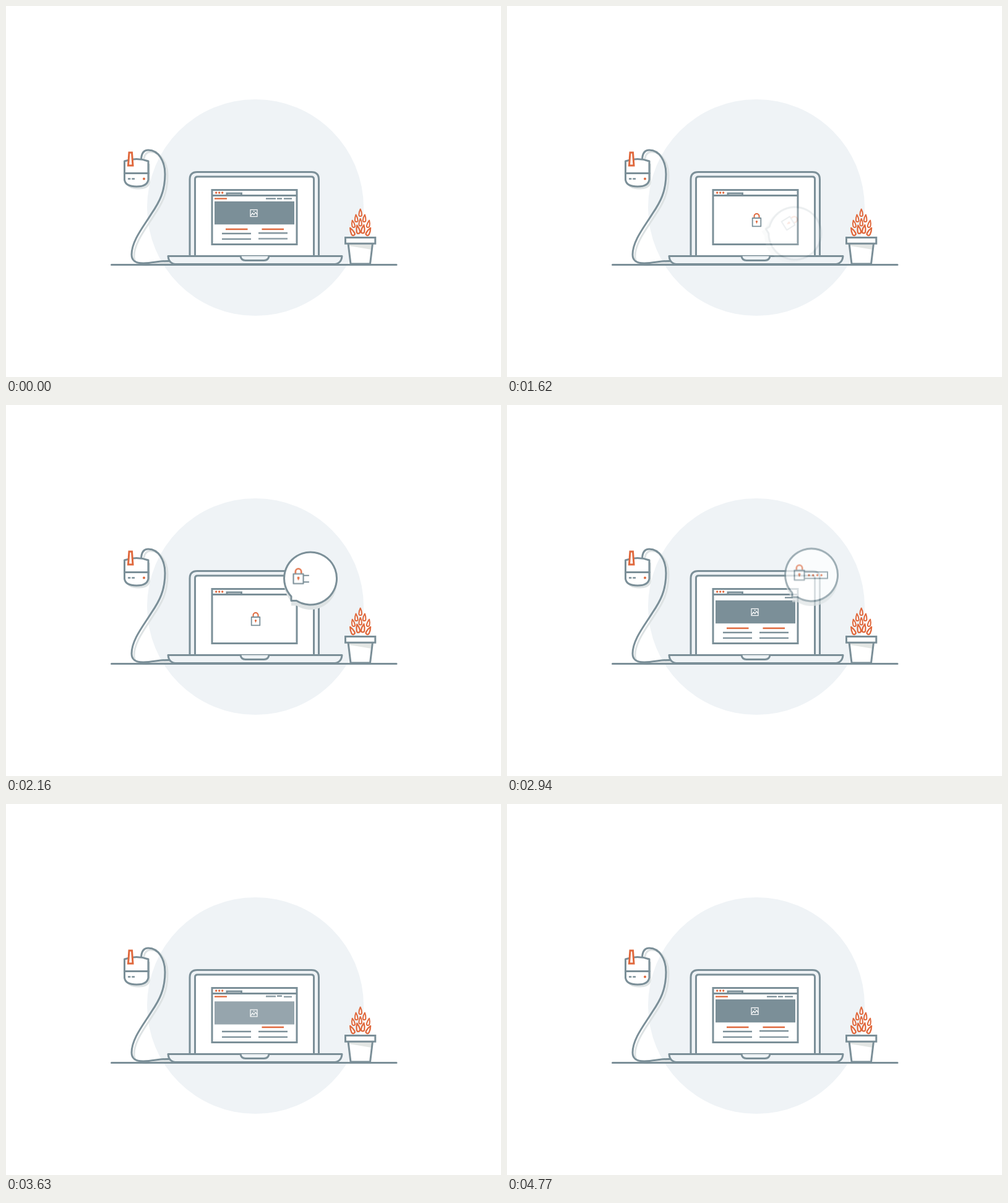
An HTML page without scripts for the animation above (4.8 s loop, 800x600 px).

```html
<!DOCTYPE html>
<html lang="en">
<head>
<meta charset="utf-8">
<title>Locked page</title>
<style>
  html, body { margin: 0; width: 100%; height: 100%; overflow: hidden; background: #fff; }
  svg { display: block; width: 800px; height: 600px; }

  .line { fill: none; stroke: #7b8f98; stroke-width: 3; stroke-linecap: round; stroke-linejoin: round; }
  .white { fill: #fff; }
  .pale { fill: #eff3f6; }
  .hot { stroke: #e0683c; }
  .dot { fill: #e0683c; }
  .shade { fill: #dee3e4; }
  .thin { stroke-width: 2.3; stroke-linecap: butt; }
  .fine { stroke-width: 1.8; }

  .led, .window, .page, .lock, .lift, .spin, .field path, .pin circle, .rise {
    animation: 4.8s linear infinite;
  }

  .led { animation-name: blink; animation-duration: .8s; }
  @keyframes blink {
    0%, 3.1% { opacity: 1; }
    3.11%, 54.4% { opacity: 0; }
    54.41%, 100% { opacity: 1; }
  }

  .window { animation-name: swap; }
  @keyframes swap {
    0%, 8.54% { transform: none; opacity: 1; animation-timing-function: ease-in; }
    11.25% { transform: translateX(-24px); opacity: 0; }
    11.26% { transform: translateX(30px); opacity: 0; }
    13.7% { transform: translateX(19px); opacity: 1; animation-timing-function: cubic-bezier(.2, .4, .6, 1); }
    19.38%, 100% { transform: none; opacity: 1; }
  }

  .page { animation-name: page; }
  @keyframes page {
    0%, 11.25% { opacity: 1; }
    11.26%, 56% { opacity: 0; }
    56.01%, 100% { opacity: 1; }
  }

  .rise { animation-name: rise; animation-delay: calc(var(--at) * 1ms - 4800ms); }
  @keyframes rise {
    0% { transform: translateY(20px); opacity: 0; animation-timing-function: cubic-bezier(.37, 0, .63, 1); }
    14.58% { transform: translateY(-1px); opacity: 1; animation-timing-function: ease-in-out; }
    18.1%, 100% { transform: none; opacity: 1; }
  }

  .lock { animation-name: lock; }
  @keyframes lock {
    0%, 19.7% { opacity: 0; animation-timing-function: ease-in-out; }
    30%, 57.2% { opacity: 1; }
    60.6%, 100% { opacity: 0; }
  }

  .lift { animation-name: lift; }
  @keyframes lift {
    0%, 33.12% { opacity: 0; transform: none; }
    33.75% { opacity: .15; }
    37% { opacity: 1; }
    57.2% { opacity: 1; transform: none; animation-timing-function: cubic-bezier(.37, 0, .63, 1); }
    68.4%, 100% { opacity: 0; transform: translateY(-20px); }
  }

  .spin { animation-name: spin; transform-origin: 400px 300px; }
  @keyframes spin {
    0%, 33.12% { transform: rotate(60deg); }
    33.75% { transform: rotate(58deg); animation-timing-function: ease-in-out; }
    39.6% { transform: rotate(-13.6deg); animation-timing-function: ease-in-out; }
    44.8%, 100% { transform: none; }
  }

  .field path { stroke-width: 2; stroke-linecap: butt; stroke-dasharray: 43 60; animation-name: draw; }
  @keyframes draw {
    0%, 42.8% { stroke-dashoffset: 43.5; animation-timing-function: cubic-bezier(.37, 0, .63, 1); }
    50%, 100% { stroke-dashoffset: 0; }
  }

  .pin circle { animation-name: pin; animation-delay: calc(var(--i) * 80ms); animation-fill-mode: backwards; }
  @keyframes pin {
    0%, 47.5% { opacity: 0; }
    49%, 90% { opacity: 1; }
    90.01%, 100% { opacity: 0; }
  }
</style>
</head>
<body>
<svg viewBox="0 0 800 600">
  <defs>
    <path id="cable" d="M218.5 248C219 236 224 233 230 233C247 233 257 252 257 272C257 300 248 317 235 336C222 357 203 380 203 402C203 411 208 416 222 416C238 416 250 411.5 265 412.5"/>
    <path id="router" d="M191.5 251Q211 244 230 251V281Q228 292 211 292Q193 292 191.5 281Z"/>
    <path id="bubble" d="M461 309.5V316.5H469.5A42.5 42.5 0 1 0 461 309.5Z"/>
    <path id="leaf" d="M0-6C2-2 2.3 1 2.3 3A2.3 2.6 0 0 1-2.3 3C-2.3 1-2-2 0-6Z"/>
    <g id="padlock">
      <path class="line fine hot" style="stroke-width:2" d="M399.5 343V340A4 4 0 0 1 407.5 340V343"/>
      <rect class="line fine white" x="396.7" y="343" width="13.6" height="13.4"/>
      <circle class="dot" cx="403.5" cy="348.5" r="1.6"/>
      <path class="line fine hot" style="stroke-width:1.4" d="M403.5 349V351"/>
    </g>
  </defs>

  <circle class="pale" cx="403" cy="326" r="175"/>

  <!-- router and cable -->
  <use href="#cable" class="line" style="stroke:#dee3e4" x="4" y="3"/>
  <use href="#router" class="shade" x="3" y="4.5"/>
  <use href="#cable" class="line"/>
  <use href="#router" class="line white"/>
  <path class="line" d="M191.5 270.5H230"/>
  <path class="line thin" d="M197 279.5H201.3M203.3 279.5H208"/>
  <circle class="dot led" cx="223" cy="279.5" r="2"/>
  <path class="line hot white" d="M199 237H203.5L205 258H197.5Z" style="stroke-linejoin:miter"/>

  <!-- plant -->
  <path class="white" d="M553 384L557 417H588.5L592.5 384Z"/>
  <path d="M554 385H592L591 394L555 388Z" fill="#e3e6e4"/>
  <path class="line" d="M553 384L557 417H588.5L592.5 384"/>
  <rect class="line white" x="548.5" y="374.5" width="48.3" height="9.7" style="stroke-linejoin:miter"/>
  <g class="line white hot" style="stroke-width:2">
    <use href="#leaf" x="572.7" y="334.5"/>
    <use href="#leaf" transform="translate(566 343.5) rotate(-5)"/>
    <use href="#leaf" transform="translate(579.4 343.5) rotate(5)"/>
    <use href="#leaf" transform="translate(561 352.5) rotate(-13)"/>
    <use href="#leaf" transform="translate(572.7 350)"/>
    <use href="#leaf" transform="translate(585.8 352.5) rotate(13)"/>
    <use href="#leaf" transform="translate(559.3 365) rotate(-27) scale(1.15)"/>
    <use href="#leaf" transform="translate(568.7 361.5) rotate(-12) scale(1.15)"/>
    <use href="#leaf" transform="translate(577.2 361) rotate(10) scale(1.15)"/>
    <use href="#leaf" transform="translate(586 365) rotate(27) scale(1.15)"/>
  </g>

  <!-- laptop -->
  <path class="line pale" d="M297 404V280.5Q297 268.5 309 268.5H493.5Q505.5 268.5 505.5 280.5V404"/>
  <path class="line white" d="M305.5 404V280Q305.5 276 309.5 276H493.5Q497.5 276 497.5 280V404"/>
  <path class="line" d="M170.5 418.5H631"/>
  <path class="line pale" d="M262 404.5H543Q542 417.5 529 417.5H276Q263 417.5 262 404.5Z"/>
  <path class="line pale" d="M379 404.5Q380 411.5 387 411.5H417Q424 411.5 425 404.5"/>

  <!-- browser -->
  <g class="window">
    <rect class="line white" x="333" y="297.5" width="137" height="88" style="stroke-linejoin:miter"/>
    <path class="line" d="M333 306.5H470M357 305.5V303H380.5V305.5" style="stroke-linejoin:miter;stroke-linecap:butt"/>
    <g class="dot">
      <circle cx="339.7" cy="302" r="1.7"/>
      <circle cx="344.7" cy="302" r="1.7"/>
      <circle cx="349.7" cy="302" r="1.7"/>
    </g>
    <g class="page">
      <path class="line thin hot rise" style="--at:2740" d="M337 311.5H357"/>
      <path class="line thin rise" style="--at:2840" d="M420 311.5H436"/>
      <path class="line thin rise" style="--at:2940" d="M438 311.5H446"/>
      <path class="line thin rise" style="--at:3040" d="M449 311.5H462"/>
      <g class="rise" style="--at:3140">
        <rect x="337" y="316" width="129" height="37.3" fill="#7b8f98"/>
        <g fill="none" stroke="#fff" stroke-width="1.2">
          <rect x="395" y="329.5" width="11" height="11"/>
          <path d="M395.5 338.8L398.6 335L400.8 337.6L403.2 333.8L406 337"/>
        </g>
        <circle cx="400.6" cy="332" r="1" fill="#fff"/>
      </g>
      <path class="line thin hot rise" style="--at:3570" d="M355 361H390.5"/>
      <path class="line thin rise" style="--at:3690" d="M349 368H396"/>
      <path class="line thin rise" style="--at:3810" d="M349 376.8H396"/>
      <path class="line thin hot rise" style="--at:3930" d="M413.5 361H449"/>
      <path class="line thin rise" style="--at:4050" d="M408 368H455"/>
      <path class="line thin rise" style="--at:4170" d="M408 376.8H455"/>
    </g>
    <use href="#padlock" class="lock"/>
  </g>

  <!-- password bubble -->
  <g class="lift">
    <g class="spin">
      <use href="#bubble" class="shade" y="8"/>
      <use href="#bubble" class="line white"/>
      <g class="field">
        <path class="line" d="M481 275.7H518V281.1"/>
        <path class="line" d="M481 286.3H518V280.9"/>
      </g>
      <g class="dot pin">
        <circle cx="488" cy="281" r="1.7" style="--i:0"/>
        <circle cx="494.8" cy="281" r="1.7" style="--i:1"/>
        <circle cx="501.5" cy="281" r="1.7" style="--i:2"/>
        <circle cx="508.2" cy="281" r="1.7" style="--i:3"/>
      </g>
      <use href="#padlock" transform="translate(472.5 281) scale(1.18) translate(-403.5 -349.75)"/>
    </g>
  </g>
</svg>
</body>
</html>
```
